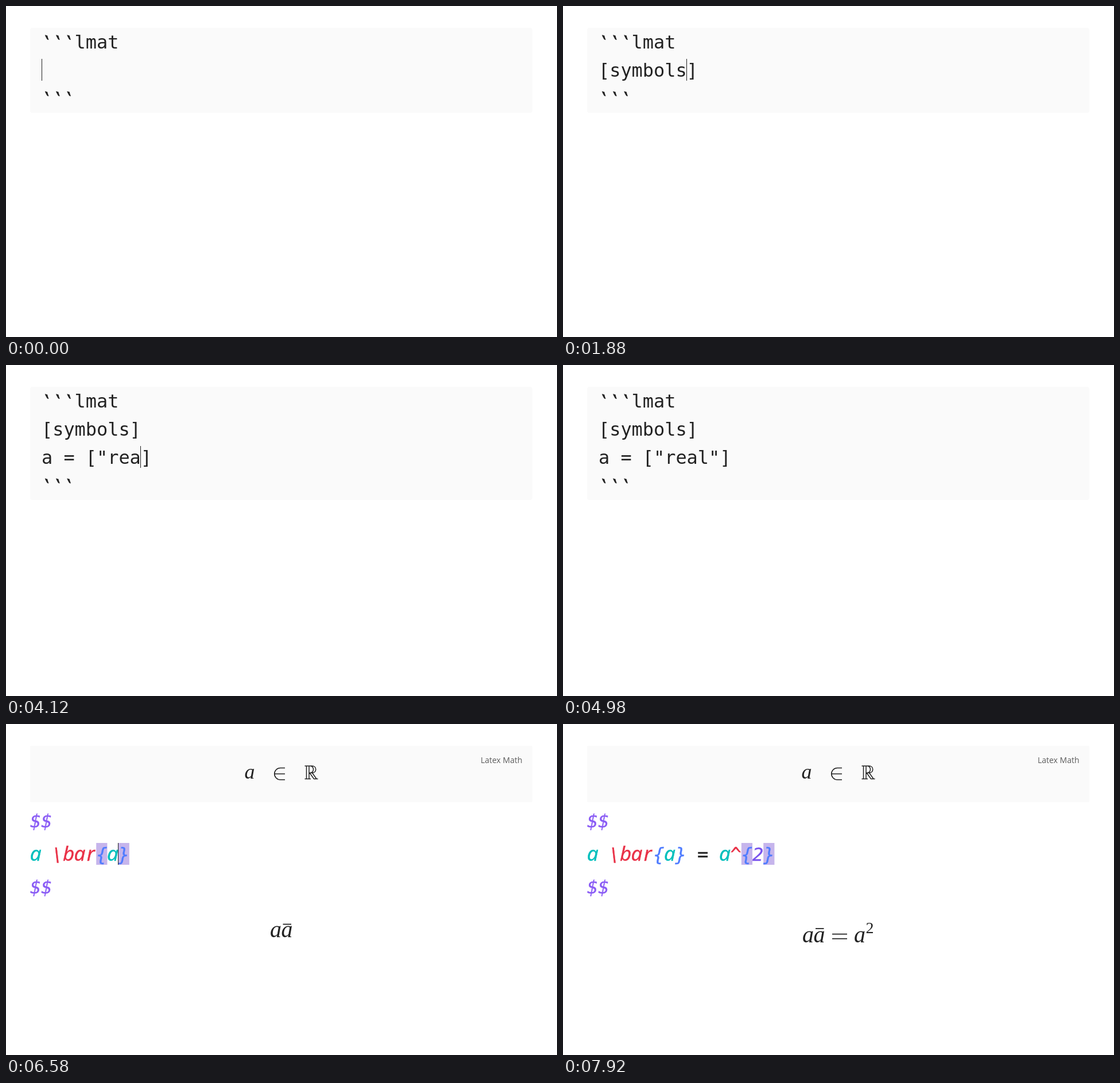
Animation, 960 px wide and 576 px high, one loop 8000 ms. Source, as an HTML page:

```html
<!DOCTYPE html>
<html lang="en">
<head>
<meta charset="utf-8">
<title>Math note</title>
<style>
html, body { margin: 0; width: 100%; height: 100%; overflow: hidden; background: #fff; }
svg { display: block; width: 960px; height: 576px; }
text { white-space: pre; fill: #222; }
.code { font: 31.9px "DejaVu Sans Mono", "Noto Sans Mono", monospace; }
.tick { font: 42px "Noto Sans Mono", monospace; text-anchor: middle; }
.tex { font: italic 35px "Noto Sans", "Open Sans", sans-serif; text-anchor: middle; stroke-width: .4; }
.sign { font: italic 32px "DejaVu Sans Mono", monospace; }
.math { font: italic 40px "Liberation Serif", "Noto Serif", serif; }
.small { font-size: 36px; }
.sup { font-size: 28px; font-style: normal; }
.label { font: 14px "Open Sans", "Noto Sans", sans-serif; fill: #5c5c5c; text-anchor: end; }
.line { fill: none; stroke: #222; stroke-width: 1.6; }
</style>
</head>
<body>
<svg id="stage" viewBox="0 0 960 576"></svg>
<script>
const LOOP = 8000, CELL = 19.2;
const stage = document.getElementById('stage');

const rect = (x, y, w, h, fill, r = 0) =>
  `<rect x="${x}" y="${y}" width="${w}" height="${h}" rx="${r}" fill="${fill}"/>`;
const text = (cls, x, y, s) => `<text class="${cls}" x="${x}" y="${y}">${s}</text>`;
const path = (d, w = 1.6) => `<path class="line" style="stroke-width:${w}" d="${d}"/>`;
const caret = (x, y) => rect(Math.floor(x), y, 1, 38, '#222');

// Steep backtick, turned about its own middle.
const tick = (x, y) =>
  `<g transform="rotate(16 ${x} ${y - 19.5})">${text('tick', x, y + 9.5, '`')}</g>`;

// Code block being edited; "|" marks the caret.
function editor(body) {
  const rows = body.split('\n'), n = rows.length;
  const fence = y => [0, 1, 2].map(i => tick(62 + CELL * (i + .5), y)).join('');
  let out = rect(42, 38, 875, 99 + 49 * n, '#fafafa', 4);
  out += fence(74) + text('code', 62 + 3 * CELL, 74, 'lmat');
  rows.forEach((row, i) => {
    const col = row.indexOf('|');
    out += text('code', 62, 123 + 49 * i, row.replace('|', ''));
    if (col >= 0) out += caret(62 + CELL * col, 92 + 49 * i);
  });
  return out + fence(123 + 49 * n);
}

function rendered() {
  return rect(42, 38, 875, 98, '#fafafa', 2) +
    text('label', 899.5, 68, 'Latex Math') +
    text('math small', 415.5, 95, 'a') +
    path('M486 76.5H478A10.2 10.2 0 0 0 478 97H486M468 86.7H486') +
    path('M520.5 73H533C542 73 542 85 533 85H528M520.5 95.5H531M523.5 73V95.5M528 73V95.5' +
      'M531 73C537 75 537 83 531 85M529 85L536.5 95.5H543.5M533.5 85L541 95.5', 1.5);
}

function tint(ch, inCommand) {
  if (inCommand || ch === '^') return '#e93147';
  if (ch === '$') return '#8a5cf5';
  if (/[{}]/.test(ch)) return '#4f7cff';
  if (/\d/.test(ch)) return '#7852ee';
  return ch === '=' ? '#222' : '#00bfbc';
}

// One row of TeX source, one glyph per cell.
function texRow(src, y, blink = true) {
  const col = src.indexOf('|'), s = src.replace('|', '');
  const command = s.indexOf('\\');
  const pair = col < 0 ? [] : [s.lastIndexOf('{'), s.lastIndexOf('}')].filter(i => i >= 0);
  let out = pair.map(i => rect(42 + CELL * i, y - 31, CELL, 38, '#c6b5ec')).join('');
  [...s].forEach((ch, i) => {
    if (ch === ' ') return;
    const fill = tint(ch, command >= 0 && i >= command && i < command + 4);
    const cls = /[a-z]/.test(ch) ? 'tex' : 'tex sign';
    out += `<text class="${cls}" x="${42 + CELL * (i + .5)}" y="${y}" style="fill:${fill};stroke:${fill}">${ch}</text>`;
  });
  return out + (col >= 0 && blink ? caret(42 + CELL * col, y - 31) : '');
}

const source = (row, preview = '', blink = true) => () =>
  rendered() + texRow('$$', 180) + texRow(row, 238, blink) + texRow('$$', 295) + preview;
const edit = body => () => editor(body);
const letters = (y, s, ...xs) => xs.map((x, i) => text('math', x, y, s[i])).join('');
const bar = (x, y) => path(`M${x} ${y}h14.5`, 1.8);

const answer = letters(380, 'aaa', 417, 436.5, 507) + bar(440, 356) +
  path('M469 365.7h26M469 373.7h26', 1.7) + text('math sup', 527.5, 364, '2');
const solved = 'a \\bar{a} = a^{2}|';
const head = '[symbols]\n';

const steps = [
  [0, edit('|')],
  [300, edit('')],
  [660, edit('[|]')],
  ...[960, 1170, 1380, 1480, 1610, 1740, 1880].map((t, i) =>
    [t, edit(`[${'symbols'.slice(0, i + 1)}|]`)]),
  [2180, edit('[symbols]|')],
  [2380, edit(head + '|')],
  [2650, edit(head + 'a|')],
  [2820, edit(head + 'a |')],
  [3020, edit(head + 'a =|')],
  [3180, edit(head + 'a = |')],
  [3350, edit(head + 'a = [|]')],
  [3650, edit(head + 'a = ["|]')],
  ...[3920, 4020, 4120, 4250].map((t, i) =>
    [t, edit(`${head}a = ["${'real'.slice(0, i + 1)}|]`)]),
  [4520, edit(head + 'a = ["real"|]')],
  [4720, edit(head + 'a = ["real"]|')],
  [4930, edit(head + 'a = ["real"]')],
  [5130, () => rendered() + caret(42, 149)],
  [5330, source('|')],
  [5540, source('a|', letters(362, 'a', 470))],
  [5710, source('a |', letters(362, 'a', 470))],
  [5980, source('a b|', letters(371, 'ab', 462, 481))],
  [6115, source('a ba|', letters(371, 'aba', 453, 472, 488))],
  [6250, source('a \\bar{|}', letters(362, 'a', 470) + bar(482, 340))],
  [6580, source('a \\bar{a|}', letters(371, 'aa', 460, 479.5) + bar(482.5, 348.5))],
  [7050, source(solved, answer)],
  [7620, source(solved, answer, false)]
];

const start = performance.now();
let shown = -1;
function frame() {
  const t = (performance.now() - start) % LOOP;
  let i = steps.length - 1;
  while (steps[i][0] > t) i--;
  if (i !== shown) {
    stage.innerHTML = steps[i][1]();
    shown = i;
  }
  requestAnimationFrame(frame);
}
frame();
</script>
</body>
</html>
```
